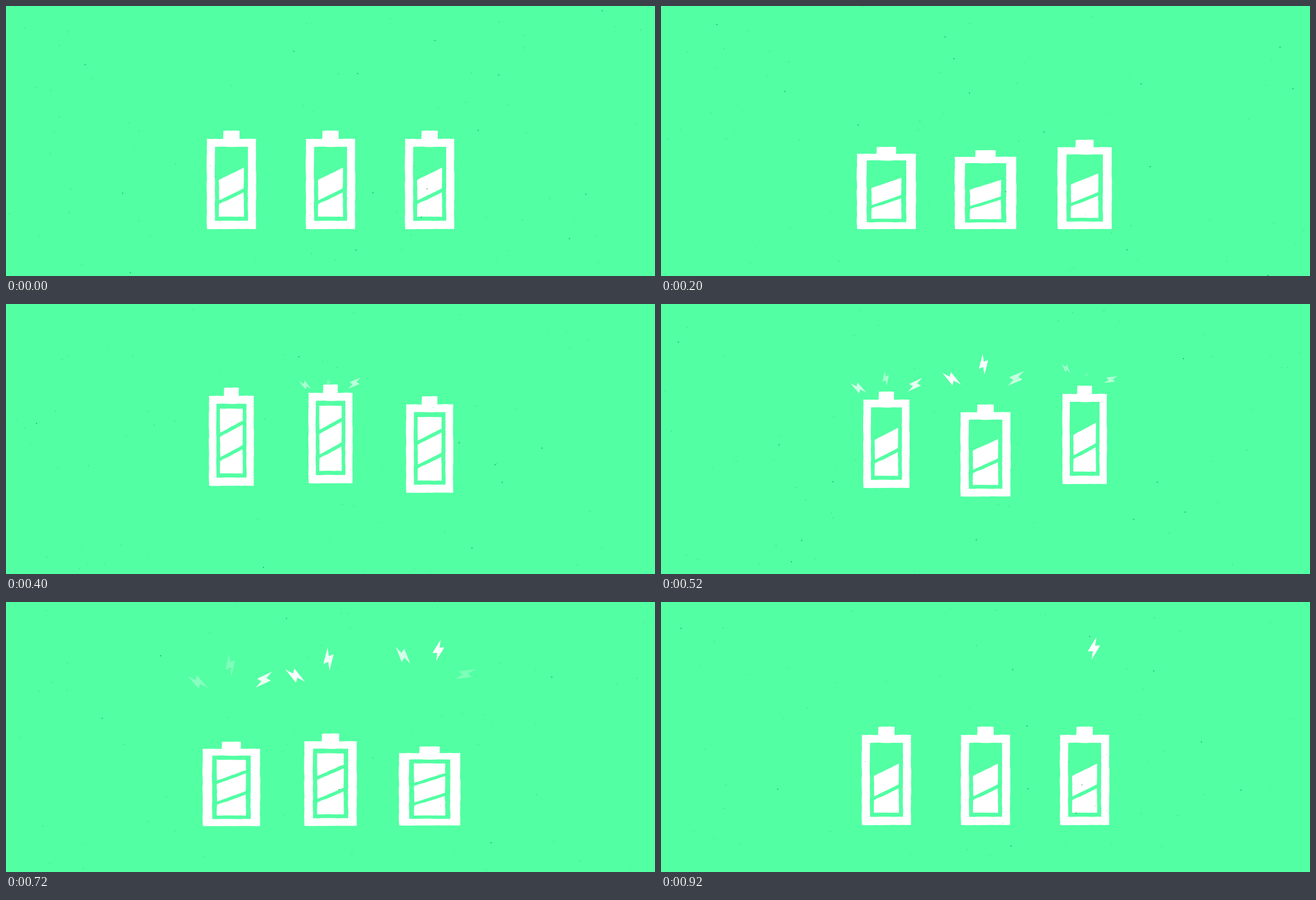
An HTML page with a canvas that plays this animation: 1159 by 483 pixels, repeating every 0.96 s.

```html
<!DOCTYPE html>
<html lang="en">
<head>
<meta charset="utf-8">
<title>Jumping batteries</title>
<style>
  html, body { margin: 0; width: 100%; height: 100%; overflow: hidden; background: #52ffa3; }
  canvas { display: block; width: 100%; height: 100%; }
</style>
</head>
<body>
<canvas id="stage" width="1159" height="483"></canvas>
<script>
const W = 1159, H = 483, TICK = 40, TICKS = 24, STEPS = 18, GROUND = 399;
const HELD_TICKS = [2, 6, 10, 14, 19, 22];
const ctx = document.getElementById('stage').getContext('2d');

const clamp = v => Math.min(1, Math.max(0, v));
const radians = degrees => degrees * Math.PI / 180;
const random = n => {
  const v = Math.sin(n * 127.1 + 11.7) * 43758.5453;
  return v - Math.floor(v);
};

const easeIn = t => t ** 3;
const easeOut = t => 1 - (1 - t) ** 3;
const sway = t => (1 - Math.cos(Math.PI * t)) / 2;

// Moves: from step, to step, value reached, easing.
const follow = (value, moves, step) => moves.reduce(
  (v, [from, to, goal, ease]) => v + (goal - v) * ease(clamp((step - from) / (to - from))), value);
const WIDTH_MOVES = [
  [2.85, 5.45, 110, sway], [5.45, 9, 78.5, easeOut],
  [9, 12.35, 111, easeIn], [13.6, 16.2, 88, sway]
];
const LIFT_MOVES = [
  [5.7, 9, 79, easeOut], [9, 12.45, 0, easeIn],
  [13.4, 14.9, -2, sway], [14.9, 16.2, 0, sway]
];

// Each battery throws a fan of three bolts: centre, turn in degrees, first step, last steps.
const BATTERIES = [
  { x: 402.5, lead: .67, fan: { x: 403, y: 185.5, turn: 0, birth: 7.1, ends: [14.6, 14.5, 15.8] } },
  { x: 579.5, lead: 1.33, fan: { x: 576, y: 176.5, turn: 2, birth: 5, ends: [16, 15.8, 11.3] } },
  { x: 756.5, lead: 0, fan: { x: 751.5, y: 154, turn: 19, birth: 8.3, ends: [15.5, 19, 14.5] } }
];
const FAN_RADIUS = 75, FAN_SPREAD = 53;
const LATER = [0, .9, -.5];
const HALF_BOLT = [[5.5, -20.3], [-11.7, 5], [-2.3, 4.8]];
const BOLT = [...HALF_BOLT, ...HALF_BOLT.map(([x, y]) => [-x, -y])];

function trace(points) {
  points.forEach(([x, y], i) => i ? ctx.lineTo(x, y) : ctx.moveTo(x, y));
  ctx.closePath();
}

// Cuts each edge into short pieces and shifts the joints a little, like a print edge.
function rough(points, seed) {
  const out = [];
  points.forEach(([x, y], i) => {
    const [nx, ny] = points[(i + 1) % points.length];
    const count = Math.max(1, Math.round(Math.hypot(nx - x, ny - y) / 8));
    for (let k = 0; k < count; k++) {
      const n = seed + out.length * 2;
      out.push([x + (nx - x) * k / count + (random(n) - .5) * .8,
                y + (ny - y) * k / count + (random(n + 1) - .5) * .8]);
    }
  });
  return out;
}

// Battery parts around the middle of the bottom edge, 88 wide and 176 high.
const SHELL = [
  rough([[-44, -161.5], [-14.7, -161.5], [-14.7, -176], [14.7, -176], [14.7, -161.5],
         [44, -161.5], [44, 0], [-44, 0]], 1),
  rough([[-29.5, -147], [29.5, -147], [29.5, -14.7], [-29.5, -14.7]], 300)
];
const cell = (topL, topR, bottomR, bottomL, seed) =>
  rough([[-22.2, topL], [22.2, topR], [22.2, bottomR], [-22.2, bottomL]], seed);
const CELLS = [
  cell(-44.5, -66, -22, -22, 500),
  cell(-88, -110, -73, -51, 600),
  cell(-138.3, -138.3, -117, -95, 700)
];

function drawBattery({ x, lead }, step) {
  const width = follow(88, WIDTH_MOVES, step + lead);
  const lift = follow(0, LIFT_MOVES, step + lead);
  const height = (88 * 176 - .26 * lift ** 2) / width;
  const blink = step % 9;
  const charged = blink >= 5 && blink <= 7;
  ctx.save();
  ctx.translate(x, GROUND - lift);
  ctx.scale(width / 88, height / 176);
  ctx.beginPath();
  SHELL.forEach(trace);
  CELLS.slice(0, charged ? 3 : 2).forEach(trace);
  ctx.fill('evenodd');
  ctx.restore();
}

function drawBolt(fan, side, step) {
  const age = step - fan.birth - LATER[side];
  const remaining = .55 ** age;
  const size = 1 - 1.2 * remaining;
  const alpha = clamp(age / 4) * clamp((fan.ends[side] - step) / 2);
  if (size <= 0 || alpha <= 0) return;
  const angle = 88 + FAN_SPREAD * (side - 1) + fan.turn;
  const reach = FAN_RADIUS * (1 - remaining);
  ctx.save();
  ctx.globalAlpha = alpha;
  ctx.translate(fan.x - reach * Math.cos(radians(angle)), fan.y - reach * Math.sin(radians(angle)));
  ctx.rotate(radians(angle - 110));
  ctx.scale(size, size);
  ctx.beginPath();
  trace(BOLT);
  ctx.fill();
  ctx.restore();
}

// Dust: each speck shows for one to four steps.
const DUST = Array.from({ length: 620 }, (_, n) => {
  const r = k => random(n * 9 + k + 2000);
  const strong = r(0) > .9;
  return {
    x: r(1) * W, y: r(2) * H,
    birth: Math.floor(r(3) * STEPS), life: 1 + Math.floor(r(4) * 4),
    alpha: strong ? .75 : .12 + r(5) * .35,
    size: strong ? 1.4 : 1
  };
});
function drawDust(step) {
  ctx.fillStyle = '#003c28';
  for (const { x, y, birth, life, alpha, size } of DUST) {
    if ((step - birth + STEPS) % STEPS >= life) continue;
    ctx.globalAlpha = alpha;
    ctx.fillRect(x, y, size, size);
  }
  ctx.globalAlpha = 1;
}

function draw(step) {
  ctx.fillStyle = '#52ffa3';
  ctx.fillRect(0, 0, W, H);
  ctx.fillStyle = '#fff';
  for (const { fan } of BATTERIES) [0, 1, 2].forEach(side => drawBolt(fan, side, step));
  BATTERIES.forEach(battery => drawBattery(battery, step));
  drawDust(step);
}

const start = performance.now();
let shown = -1;
function play() {
  const tick = Math.floor(Math.max(0, performance.now() - start) / TICK) % TICKS;
  const step = tick - HELD_TICKS.filter(held => held <= tick).length;
  if (step !== shown) draw(shown = step);
  requestAnimationFrame(play);
}
play();
</script>
</body>
</html>
```
